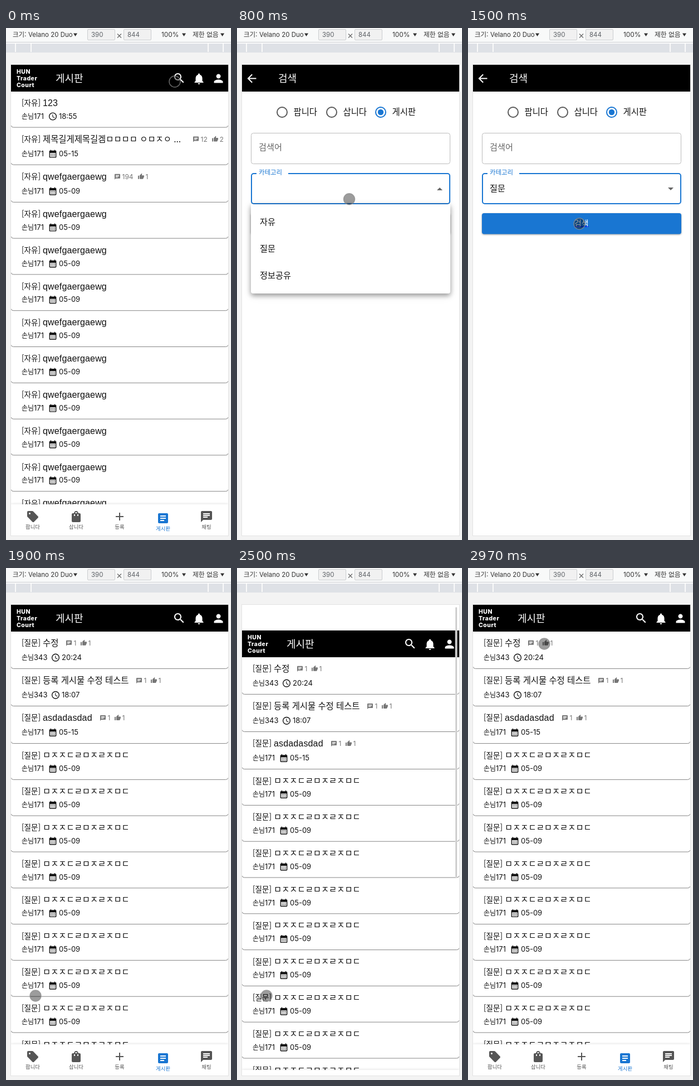
An HTML page that plays this animation: 404x918 px, repeating every 3140 ms.

```html
<!DOCTYPE html>
<html lang="ko">
<head>
<meta charset="utf-8">
<title>게시판 검색</title>
<style>
  html, body { margin: 0; width: 100%; height: 100%; overflow: hidden; background: #f3f3f3; }
  svg { display: block; }
  text { font-family: Inter, 'Noto Sans CJK KR', sans-serif; white-space: pre; }
  .ko { font-family: 'Noto Sans CJK KR', 'Noto Sans CJK', sans-serif; }
  .latin { font-family: 'Liberation Sans', sans-serif; letter-spacing: .15px; }
  .logo { letter-spacing: .5px; }
  .menu { filter: drop-shadow(0 4px 4px rgba(0,0,0,.3)) drop-shadow(0 2px 6px rgba(0,0,0,.16)); }
  .button { filter: drop-shadow(0 1.5px 1.5px rgba(0,0,0,.38)); }
  .nav { filter: drop-shadow(0 -1px 2px rgba(0,0,0,.1)); }
</style>
</head>
<body>
<svg id="stage" width="404" height="918" viewBox="0 0 404 918"></svg>
<script>
const LOOP = 3140, BLUE = '#1976d2';

// Icon outlines on a 24-unit grid
const ICONS = {
  search: 'M15.5 14h-.79l-.28-.27C15.41 12.59 16 11.11 16 9.5 16 5.91 13.09 3 9.5 3S3 5.91 3 9.5 5.91 16 9.5 16c1.61 0 3.09-.59 4.23-1.57l.27.28v.79l5 4.99L20.49 19l-4.99-5zm-6 0C7.01 14 5 11.99 5 9.5S7.01 5 9.5 5 14 7.01 14 9.5 11.99 14 9.5 14z',
  bell: 'M12 22c1.1 0 2-.9 2-2h-4c0 1.1.89 2 2 2zm6-6v-5c0-3.07-1.64-5.64-4.5-6.32V4c0-.83-.67-1.5-1.5-1.5s-1.5.67-1.5 1.5v.68C7.63 5.36 6 7.92 6 11v5l-2 2v1h16v-1l-2-2z',
  person: 'M12 12c2.21 0 4-1.79 4-4s-1.79-4-4-4-4 1.79-4 4 1.79 4 4 4zm0 2c-2.67 0-8 1.34-8 4v2h16v-2c0-2.66-5.33-4-8-4z',
  back: 'M20 11H7.83l5.59-5.59L12 4l-8 8 8 8 1.41-1.41L7.83 13H20v-2z',
  clock: 'M12 2a10 10 0 1 0 0 20a10 10 0 1 0 0-20zm0 18a8 8 0 1 1 0-16a8 8 0 1 1 0 16zm.5-13H11v6l5.25 3.15.75-1.23-4.5-2.67z',
  calendar: 'M19 4h-1V2h-2v2H8V2H6v2H5c-1.1 0-2 .9-2 2v14c0 1.1.9 2 2 2h14c1.1 0 2-.9 2-2V6c0-1.1-.9-2-2-2zm0 16H5V10h14v10zM9 14H7v-2h2v2zm4 0h-2v-2h2v2zm4 0h-2v-2h2v2zm-8 4H7v-2h2v2zm4 0h-2v-2h2v2zm4 0h-2v-2h2v2z',
  chat: 'M20 2H4c-1.1 0-2 .9-2 2v18l4-4h14c1.1 0 2-.9 2-2V4c0-1.1-.9-2-2-2zM6 9h12v2H6V9zm8 5H6v-2h8v2zm4-6H6V6h12v2z',
  thumb: 'M1 21h4V9H1v12zm22-11c0-1.1-.9-2-2-2h-6.31l.95-4.57.03-.32c0-.41-.17-.79-.44-1.06L14.17 1 7.59 7.59C7.22 7.95 7 8.45 7 9v10c0 1.1.9 2 2 2h9c.83 0 1.54-.5 1.84-1.22l3.02-7.05c.09-.23.14-.47.14-.73v-2z',
  tag: 'M21.41 11.41l-8.83-8.83c-.37-.37-.88-.58-1.41-.58H4c-1.1 0-2 .9-2 2v7.17c0 .53.21 1.04.59 1.41l8.83 8.83c.78.78 2.05.78 2.83 0l7.17-7.17c.78-.78.78-2.04-.01-2.83zM6.5 8C5.67 8 5 7.33 5 6.5S5.67 5 6.5 5 8 5.67 8 6.5 7.33 8 6.5 8z',
  bag: 'M18 6h-2c0-2.21-1.79-4-4-4S8 3.79 8 6H6c-1.1 0-2 .9-2 2v12c0 1.1.9 2 2 2h12c1.1 0 2-.9 2-2V8c0-1.1-.9-2-2-2zm-8 4c0 .55-.45 1-1 1s-1-.45-1-1V8h2v2zm2-6c1.1 0 2 .9 2 2h-4c0-1.1.9-2 2-2zm4 6c0 .55-.45 1-1 1s-1-.45-1-1V8h2v2z',
  plus: 'M19 13h-6v6h-2v-6H5v-2h6V5h2v6h6v2z',
  article: 'M19 3H5c-1.1 0-2 .9-2 2v14c0 1.1.9 2 2 2h14c1.1 0 2-.9 2-2V5c0-1.1-.9-2-2-2zm-5 14H7v-2h7v2zm3-4H7v-2h10v2zm0-4H7V7h10v2z'
};

const rect = (x, y, w, h, fill, extra = '') =>
  `<rect x="${x}" y="${y}" width="${w}" height="${h}" fill="${fill}" ${extra}/>`;
const text = (x, y, size, str, fill = '#111', extra = '') =>
  `<text x="${x}" y="${y}" font-size="${size}" fill="${fill}" ${extra}>${str}</text>`;
const ko = (x, y, size, str, fill, extra = '') => text(x, y, size, str, fill, `class="ko" ${extra}`);
const icon = (name, cx, cy, size, fill) =>
  `<path d="${ICONS[name]}" fill="${fill}" transform="translate(${cx - size / 2} ${cy - size / 2}) scale(${size / 24})"/>`;
const triangle = (x, y, w, h, fill) => `<path d="M${x} ${y}h${w}l${-w / 2} ${h}z" fill="${fill}"/>`;
const group = (id, body, extra = '') => `<g id="${id}" ${extra}>${body}</g>`;

function toolbar() {
  const sizeBox = (x, value) =>
    rect(x + .5, 2.5, 49, 19, '#f1f1f1', 'rx="1.5" stroke="#cbcdd0"') + text(x + 7, 16, 11.5, value, '#5f6368');
  return rect(0, 0, 404, 25, '#f8f9f9') + rect(0, 25, 404, 1, '#cacdd1') +
    rect(0, 26, 404, 2, '#fafafa') + rect(0, 28, 404, 16, '#dee1e6') +
    [16, 44, 362, 389].map(x => rect(x, 28, 2, 15, '#fafafa')).join('') +
    ko(12, 16, 11.5, '크기:', '#333') + text(40, 16, 11.5, 'Velano 20 Duo', '#333') +
    sizeBox(146, '390') + sizeBox(211, '844') +
    `<path d="M200 10.500l7 7m0-7l-7 7" stroke="#666" stroke-width="1.2"/>` +
    text(279, 16, 11.8, '100%', '#333') + ko(335, 16, 11.8, '제한 없음', '#333') +
    [121, 316, 385].map(x => triangle(x, 9.5, 7, 5.5, '#333')).join('');
}

const MEMBERS = ['손님171', '손님343'];

function row(top, height, post) {
  const { tag, title, member = 0, date, time, stats } = post;
  const metaY = top + (stats ? 51.2 : 49), shift = member * 5, bottom = top + height - .5;
  const isLatin = /^[a-z0-9]+$/.test(title);
  let out = ko(28, top + 25.4, 13.5, `[${tag}]`) +
    (isLatin ? text(66, top + 26.2, 16, title, '#111', 'class="latin"') : ko(66, top + 26, 15.4, title)) +
    ko(28, metaY, 12, MEMBERS[member].slice(0, 2)) + text(50, metaY, 13, MEMBERS[member].slice(2)) +
    icon(time ? 'clock' : 'calendar', 84 + shift, metaY - 4.3, 17, '#111') +
    text(95 + shift, metaY, 13, time || date);
  if (stats) {
    const [x, comments, likes] = stats, likeX = x + 17.5 + 8 * String(comments).length;
    out += icon('chat', x + 5, top + 21, 12, '#777') + text(x + 13.5, top + 25.2, 12, comments, '#777') +
      icon('thumb', likeX + 6, top + 20.5, 12, '#777') + text(likeX + 14, top + 25.2, 12, likes, '#777');
  }
  return out + `<path d="M9.300 ${bottom - 3}q.5 3 4 3h381.400q3.500 0 4-3" fill="none" stroke="#858585"/>`;
}

function rows(posts) {
  let top = 113.8;
  return posts.map(post => {
    const height = post.stats ? 67.1 : 64.8, out = row(top, height, post);
    top += height;
    return out;
  }).join('');
}

const repeat = (count, post) => Array(count).fill(post);
const freePosts = [
  { tag: '자유', title: '123', time: '18:55' },
  { tag: '자유', title: '제목길게제목길겜ㅁㅁㅁㅁ ㅇㅁㅈㅇ ...', date: '05-15', stats: [336, 12, 2] },
  { tag: '자유', title: 'qwefgaergaewg', date: '05-09', stats: [195, 194, 1] },
  ...repeat(10, { tag: '자유', title: 'qwefgaergaewg', date: '05-09' })
];
const questionPosts = [
  { tag: '질문', title: '수정', member: 1, time: '20:24', stats: [108, 1, 1] },
  { tag: '질문', title: '등록 게시물 수정 테스트', member: 1, time: '18:07', stats: [234, 1, 1] },
  { tag: '질문', title: 'asdadasdad', date: '05-15', stats: [169, 1, 1] },
  ...repeat(18, { tag: '질문', title: 'ㅁㅈㅈㄷㄹㅁㅈㄹㅈㅁㄷ', date: '05-09' })
];

function boardChrome() {
  const tabs = [['tag', '팝니다'], ['bag', '삽니다'], ['plus', '등록'], ['article', '게시판'], ['chat', '채팅']];
  return rect(9, 66, 390, 48, '#000') +
    ['HUN', 'Trader', 'Court'].map((word, i) =>
      text(19, 82 + 12 * i, 10.5, word, '#fff', 'class="logo" font-weight="800"')).join('') +
    ko(89, 96.5, 18, '게시판', '#fff', 'font-weight="500"') +
    icon('search', 311, 90, 24, '#fff') + icon('bell', 346.5, 91, 24, '#fff') + icon('person', 381.5, 90.5, 24, '#fff') +
    rect(9, 854, 390, 56, '#fff', 'class="nav"') +
    tabs.map(([name, label], i) => {
      const x = 48 + 78 * i, active = i === 3, color = active ? BLUE : '#555';
      return icon(name, x, active ? 879 : 876, 24, color) +
        ko(x, active ? 900.5 : 897.5, 9.4, label, color, 'text-anchor="middle"');
    }).join('');
}

function searchPage() {
  const radio = (x, label, on) =>
    `<circle cx="${x}" cy="151" r="9" fill="none" stroke="${on ? BLUE : '#5a5a5a'}" stroke-width="2"/>` +
    (on ? `<circle cx="${x}" cy="151" r="5.200" fill="${BLUE}"/>` : '') + ko(x + 20.5, 155.5, 15.4, label);
  const field = y => rect(25.5, y + .5, 357, 55, '#fff', 'rx="4" stroke="#bbb"');
  const idle = field(260) + ko(39, 291, 15.2, '카테고리', '#666') + triangle(359, 286, 10, 5, '#666');
  const focused = rect(26, 261, 356, 54, '#fff', `rx="4" stroke="${BLUE}" stroke-width="2"`) +
    rect(35, 259, 57, 4, '#fff') + ko(39, 262.5, 11.4, '카테고리', BLUE);
  const menu = `<path class="menu" d="M25 316h358v156q0 4-4 4h-350q-4 0-4-4z" fill="#fff"/>` +
    ['자유', '질문', '정보공유'].map((label, i) => ko(41, 352.5 + 48 * i, 15.2, label)).join('');
  return rect(9, 66, 390, 844, '#fff') + rect(9, 66, 390, 48, '#000') + icon('back', 26.5, 90.5, 24, '#fff') +
    ko(74, 96.5, 18, '검색', '#fff', 'font-weight="500"') +
    radio(81, '팝니다') + radio(170, '삽니다') + radio(258, '게시판', true) +
    field(188) + ko(39, 219, 15.2, '검색어', '#666') +
    rect(25, 332, 358, 37.5, BLUE, 'rx="4" class="button"') +
    ko(191, 354.5, 13.9, '검색', '#fff', 'font-weight="500"') + rect(191, 355.5, 25.5, 1, '#0000ee') +
    group('idle', idle) + group('focused', focused) +
    group('open', triangle(359, 291, 10, -5, '#666') + menu) +
    group('chosen', ko(39, 293, 15.2, '질문') + triangle(359, 286, 10, 5, '#666'));
}

document.getElementById('stage').innerHTML =
  `<clipPath id="screen"><rect x="9" y="66" width="390" height="844"/></clipPath>` +
  rect(0, 44, 404, 874, '#f3f3f3') + toolbar() +
  rect(8.5, 65.5, 391, 845, '#fff', 'stroke="#e2e2e2"') +
  group('view',
    group('board', group('free', rows(freePosts)) + group('questions', rows(questionPosts)) + boardChrome()) +
    group('search', searchPage()) +
    rect(392, 0, 3.2, 485, '#c8c8c8', 'id="thumb" rx="1.600" stroke="#fff" stroke-opacity=".5"'),
    'clip-path="url(#screen)"') +
  `<circle id="pointer" r="10" fill="#000" fill-opacity=".39" stroke="#8c8c8c" stroke-opacity=".75" stroke-width="1.500"/>`;

const el = id => document.getElementById(id);
const show = (id, on) => { el(id).style.display = on ? '' : 'none'; };
const move = (id, x, y) => el(id).setAttribute('transform', `translate(${x} ${y})`);

// Linear interpolation through [time, ...values] keys
function sample(keys, time) {
  const next = keys.findIndex(key => key[0] >= time);
  if (next < 0) return keys[keys.length - 1].slice(1);
  if (next === 0) return keys[0].slice(1);
  const a = keys[next - 1], b = keys[next], k = (time - a[0]) / (b[0] - a[0]);
  return a.slice(1).map((v, i) => v + (b[i + 1] - v) * k);
}

const POINTER = [[0, 303, 96], [100, 311, 92], [200, 311, 92], [500, 239, 279], [700, 239, 281], [1100, 89, 384],
  [1200, 70, 392], [1300, 70, 392], [1500, 200, 351], [1600, 200, 351], [1900, 53, 767], [2500, 53, 767],
  [2600, 56, 700], [2800, 132, 136], [2970, 137, 136]];
const SCROLL = [[1900, 0], [2000, 130], [2100, 330], [2200, 451.5], [2300, 330], [2400, 60], [2500, -46],
  [2600, -10], [2700, 0]];

function draw(now) {
  const t = now % LOOP;
  const time = t >= 2970 ? 2970 : Math.min(2800, Math.floor(t / 100) * 100);
  const [scroll] = sample(SCROLL, time), down = Math.max(0, scroll);
  const searching = time >= 200 && time < 1700;

  show('search', searching);
  show('board', !searching);
  show('free', time < 200);
  show('questions', time >= 1700);
  show('idle', time < 700);
  show('focused', time >= 700);
  show('open', time >= 700 && time < 1300);
  show('chosen', time >= 1300);
  show('thumb', time >= 2000 && time <= 2600);

  move('board', 0, Math.max(0, -scroll));
  move('questions', 0, -down);
  move('thumb', 0, 70 + down * .576);
  move('pointer', ...sample(POINTER, time));
  requestAnimationFrame(() => draw(performance.now() - start));
}
const start = performance.now();
draw(0);
</script>
</body>
</html>
```
